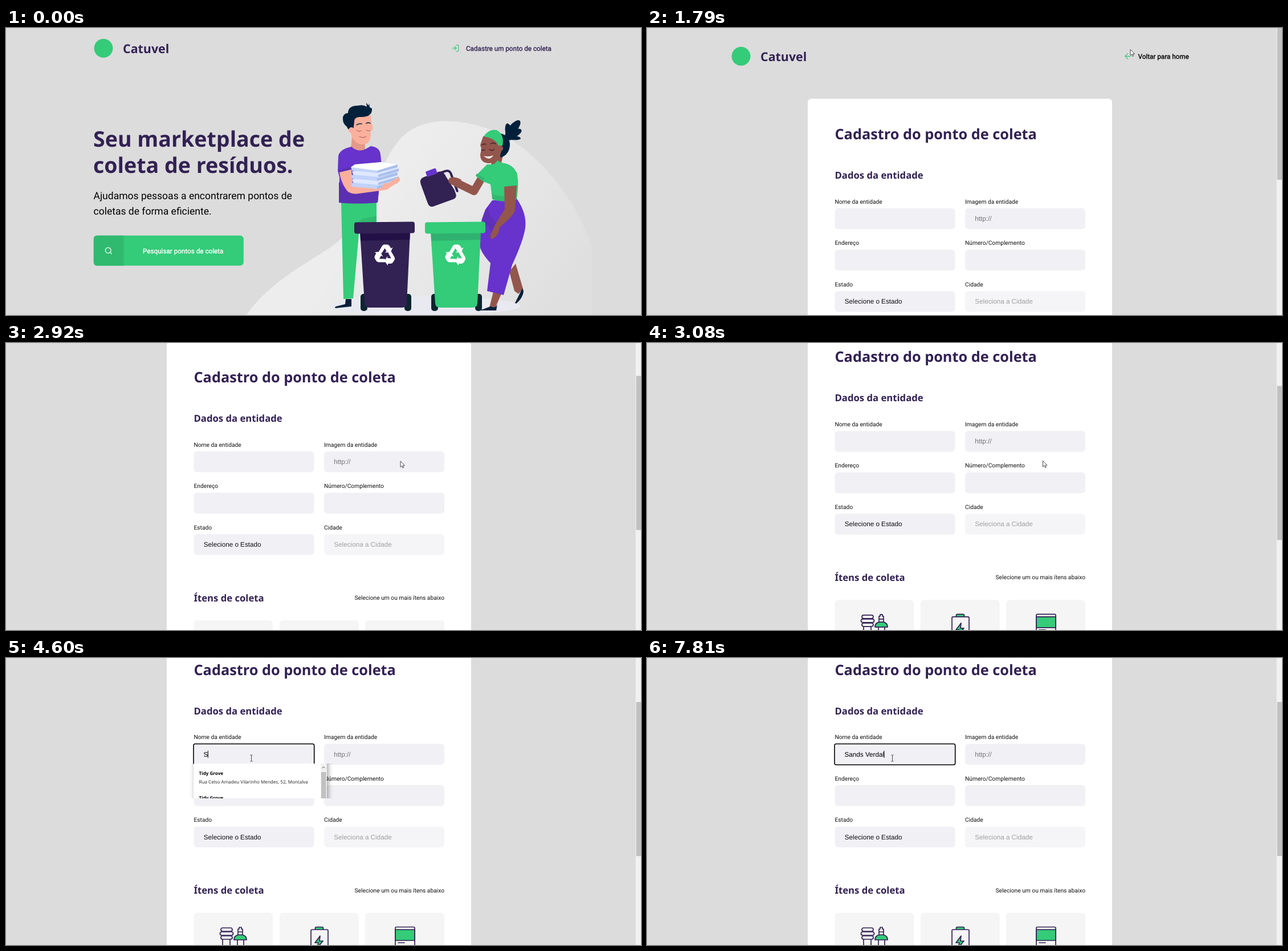
Write an HTML page that moves like this. It is 1114x503 px and loops after 8000 ms.

```html
<!DOCTYPE html>
<html lang="pt-BR">
<head>
<meta charset="utf-8">
<title>Ponto de coleta</title>
<style>
html, body { margin: 0; width: 100%; height: 100%; overflow: hidden; background: #dcdcdc; }
svg { display: block; }
text { text-rendering: geometricPrecision; white-space: pre; }
.head { font-family: "Noto Sans", sans-serif; font-weight: 700; fill: #322153; }
.h1 { font-size: 37.6px; }
.h2 { font-size: 25.3px; }
.h3 { font-size: 16.7px; }
.brand { font-size: 21.4px; }
.lead { font: 17.53px Roboto, sans-serif; }
.link { font: 11.69px Roboto, sans-serif; stroke-width: .35px; }
.label { font: 10.23px Roboto, sans-serif; fill: #111; }
.input { font: 11.69px "Liberation Sans", Arial, sans-serif; }
.tip { font: 8.1px "Open Sans", sans-serif; fill: #222; }
.tip.b { font-weight: 700; fill: #000; }
.icon { fill: none; stroke: #34cb79; stroke-width: 2; stroke-linecap: round; stroke-linejoin: round; }
.item { stroke: #322153; stroke-width: 1.7; stroke-linejoin: round; stroke-linecap: round; fill: #f5f5f5; }
.item .g { fill: #34cb79; }
.skin { fill: #fbb09d; }
.brown { fill: #93564c; }
.navy { fill: #02203a; }
.green { fill: #34cb79; }
.purple { fill: #6733cc; }
.plum { fill: #322153; }
.line { fill: none; stroke-linecap: round; stroke-linejoin: round; }
</style>
</head>
<body>
<svg width="1114" height="503" viewBox="0 0 1114 503">
<defs>
  <linearGradient id="blob" gradientUnits="userSpaceOnUse" x1="680" y1="260" x2="980" y2="470">
    <stop offset="0" stop-color="#ededed"/><stop offset="1" stop-color="#dfdfdf"/>
  </linearGradient>
  <path id="turn" d="M-11-6L-5.500-15.500Q-4-18.500-1-18.500H3.500Q6.500-18.500 8-16L10.500-11.800 13.500-13.500 9.500-4.500H-.5L2.700-6.500-.5-12-6-3z"/>
  <g id="recycle" fill="#fff">
    <use href="#turn"/><use href="#turn" transform="rotate(120)"/><use href="#turn" transform="rotate(240)"/>
  </g>
  <g id="bin">
    <g fill="#0c2530"><rect x="11" y="126" width="12" height="30" rx="5"/><rect x="88" y="126" width="12" height="30" rx="5"/></g>
    <path d="M10 17H98L92 143q-1 7-8 7H26q-7 0-8-7z"/>
    <path d="M10 18H98L97.500 31 11 33z" fill="#12003a" fill-opacity="var(--shade)"/>
    <rect width="106" height="20" rx="4" transform="rotate(-.5 53 10)"/>
    <use href="#recycle" x="54" y="58"/>
  </g>
  <clipPath id="listClip"><rect id="listBox" x="300" y="185" width="290" height="61"/></clipPath>
</defs>
<rect width="1114" height="503" fill="#dcdcdc"/>

<g id="home">
  <path d="M422 503C458 450 520 416 570 384C636 338 648 244 692 194C726 156 788 158 838 174C915 196 996 286 1028 385V503z" fill="url(#blob)"/>
  <circle cx="171" cy="35.500" r="16.500" class="green"/>
  <text class="head brand" x="205" y="44">Catuvel</text>
  <g class="icon" transform="translate(781 28) scale(.61)"><path d="M15 3h4a2 2 0 0 1 2 2v14a2 2 0 0 1-2 2h-4M10 17l5-5-5-5M15 12H3"/></g>
  <text class="link" x="807" y="39.500" fill="#322153" stroke="#322153">Cadastre um ponto de coleta</text>
  <text class="head h1" x="153" y="208">Seu marketplace de</text>
  <text class="head h1" x="153" y="254">coleta de resíduos.</text>
  <text class="lead" x="153.500" y="299.500">Ajudamos pessoas a encontrarem pontos de</text>
  <text class="lead" x="153.500" y="327">coletas de forma eficiente.</text>
  <rect x="153.800" y="363.800" width="263" height="52.600" rx="6" class="green"/>
  <path d="M206.500 363.800H159.800q-6 0-6 6v40.600q0 6 6 6h46.700z" fill="#30ba6f"/>
  <g class="icon" transform="translate(172.500 383) scale(.61)" style="stroke:#fff"><circle cx="11" cy="11" r="8"/><path d="M21 21l-4.300-4.300"/></g>
  <text class="link" x="240" y="394.500" fill="#fff" stroke="#fff">Pesquisar pontos de coleta</text>

  <ellipse cx="735" cy="487" rx="167" ry="16.500" fill="#e9e9f1"/>
  <!-- man -->
  <path class="green" d="M588 305H650V345L620 350 609 474 592 475z"/>
  <path d="M626 334L650 330V345H612z" fill="#30ba6f"/>
  <path class="navy" d="M596 475H606V488L578 491Q576 489 579 488L595 484z"/>
  <path d="M607 190H630V212Q620 219 605 212z" fill="#e39a88"/>
  <path class="purple" d="M583 224Q586 212 606 208Q618 219 631 212L640 207Q656 209 657 222L659 240 652 306Q615 309 584 306L585 262 582 250z"/>
  <path d="M584 270Q600 296 654 285L652 306Q615 309 584 306z" fill="#5a30b0"/>
  <path d="M584 249L606 243 608 250 586 254z" fill="#5a30b0"/>
  <path class="skin" d="M585 253L606 248 608 276 662 275 670 270 690 262Q693 266 684 273L664 284 620 290Q602 293 596 282Q587 268 585 253z"/>
  <g id="papers"></g>
  <path class="skin" d="M659 281Q661 270 671 272L686 262Q693 262 690 269L680 275 667 284z"/>
  <path class="skin" d="M607 156L640 153 641 165 644 176 640 181Q641 204 627 204Q609 204 605 184z"/>
  <path class="navy" d="M591 160Q590 150 600 149Q600 136 618 136Q627 134 633 138L632 131 636 136 637 132 638 139 642 141Q643 156 623 156Q611 155 611 164L609 182Q600 180 598 173Q591 168 591 160z"/>
  <circle cx="606" cy="179" r="5" class="skin"/>
  <path class="line" stroke="#02203a" stroke-width="1.500" d="M615 170q4-3 9-2M632 167q4-2 7 0"/>
  <path class="line" stroke="#9b5c55" d="M615 179q4 4 8 1M632 179q4 3 7 0M620 190q6 4 12 0"/>

  <use href="#bin" x="611" y="340" class="plum" style="--shade:.5"/>
  <!-- jug -->
  <g transform="translate(758 281) rotate(-20)">
    <path class="line" stroke="#322153" stroke-width="4" d="M14-24H22Q30-24 30-16V16"/>
    <path class="plum" d="M-16-27H10Q19-27 20-15L26 12V19Q26 27 18 27H-18Q-26 27-26 18V-17Q-26-27-16-27z"/>
    <rect class="purple" x="-11" y="-35" width="19" height="10" rx="2"/>
  </g>

  <!-- woman -->
  <path class="brown" d="M883 427L894 413 907 457 899 466 892 461z"/>
  <path class="navy" d="M893 482L906 456 908 461Q907 473 895 483z"/>
  <path class="brown" d="M855 462L869 466 859 489 848 490z"/>
  <path class="navy" d="M831 495L850 488Q860 492 862 484L860 495z"/>
  <path class="purple" d="M853 302L896 299Q914 325 911 350Q908 372 888 415L873 468 844 461 850 412Q833 394 831 381Q828 350 841 318z"/>
  <path d="M845 314Q848 334 866 345L858 368 848 350 834 336z" fill="#5a30b0" opacity=".6"/>
  <path class="line" stroke="#93564c" stroke-width="14" d="M835 262L821 286 794 273"/>
  <path class="brown" d="M799 266Q786 259 778 263Q774 268 779 273L793 280z"/>
  <path class="brown" d="M853 222H872L868 242 851 243z"/>
  <path class="green" d="M824 259L844 239Q858 241 862 232L869 236Q888 238 895 252Q901 266 896 300Q872 307 853 300L850 274 837 269z"/>
  <path d="M824 259L837 269 840 264 826 255zM853 291Q872 298 896 291V300Q872 307 853 300z" fill="#30ba6f"/>
  <path class="brown" d="M874 278L896 276 893 320Q889 331 866 349Q865 365 852 370Q847 366 853 356L858 345 875 317z"/>
  <path class="green" d="M874 250Q872 263 873 278L896 275 897 254z"/>
  <g class="navy">
    <ellipse cx="889" cy="177" rx="19" ry="7.500" transform="rotate(-50 889 177)"/>
    <ellipse cx="890" cy="186" rx="16" ry="6.500" transform="rotate(-28 890 186)"/>
    <ellipse cx="882" cy="182" rx="15" ry="6" transform="rotate(-100 882 182)"/>
    <ellipse cx="888" cy="192" rx="15" ry="4" transform="rotate(6 888 192)"/>
    <path d="M862 184Q884 186 884 205Q883 222 868 227L858 205z"/>
  </g>
  <path class="brown" d="M837 190Q866 184 870 208Q868 237 848 237Q832 237 832 222L834 212 832 205z"/>
  <path class="green" d="M838 190Q847 176 861 179Q875 187 871 206L864 206Q858 193 838 190z"/>
  <circle cx="867" cy="211" r="5" class="brown"/>
  <path class="line" stroke="#3b1c26" stroke-width="1.300" d="M835 205q4-3 7-1M850 203q5-3 9 0M834 213q4 3 6 0M848 213q5 3 8 0"/>
  <path d="M838 224Q847 227 855 223Q848 234 838 224z" fill="#fff"/>

  <use href="#bin" x="735" y="340" class="green" style="--shade:.13"/>
</g>

<g id="form">
  <g id="page">
    <circle cx="165" cy="49.500" r="16.500" class="green"/>
    <text class="head brand" x="199" y="58">Catuvel</text>
    <g class="icon" transform="translate(836.300 42.200) scale(.61)"><path d="M20 12H4M12 20l-8-8 8-8"/></g>
    <text class="link" x="861.500" y="53.800" stroke="#000">Voltar para home</text>
    <rect x="282" y="124" width="534" height="900" rx="6" fill="#fff"/>
    <text class="head h2" x="329.500" y="195">Cadastro do ponto de coleta</text>
    <text class="head h3" x="329.500" y="264">Dados da entidade</text>
    <g id="fields"></g>
    <text class="head h3" x="329.500" y="578.500">Ítens de coleta</text>
    <text class="label" x="769" y="576" text-anchor="end">Selecione um ou mais ítens abaixo</text>
    <g fill="#f5f5f5">
      <rect x="329.500" y="612" width="138.500" height="130" rx="6"/>
      <rect x="480" y="612" width="138.500" height="130" rx="6"/>
      <rect x="630" y="612" width="139" height="130" rx="6"/>
    </g>
    <g class="item" transform="translate(0 165.500)">
      <rect x="380" y="492" width="13" height="16"/>
      <rect x="377" y="473" width="20" height="6" rx="3"/><rect x="375.500" y="480" width="23" height="6" rx="3"/><rect x="377" y="487" width="20" height="6" rx="3"/>
      <path d="M407 485V475H409V472H413V475H415V485M407 480H415M406 493V508H417V493"/>
      <path class="g" d="M400 494Q400 485 411 485Q422 485 422 494z"/>
      <rect class="g" x="542.500" y="471.500" width="14" height="8" rx="2"/>
      <rect x="535" y="476" width="30" height="45" rx="2"/>
      <path class="g" d="M551 487L542 499H548L546 508 556 496H550z"/>
      <rect x="683" y="471.500" width="34" height="50" rx="2"/>
      <path class="g" d="M683 476H717V495H683z"/>
      <path d="M688 499H699"/>
    </g>
    <rect id="ring" x="329" y="316" width="211.700" height="36.700" rx="3" fill="none" stroke="#000" stroke-width="1.600"/>
    <text id="typed" class="input" x="346.500" y="338"></text>
    <path id="caret" d="M0 328V340.500" stroke="#000" stroke-width="1"/>
  </g>
  <g id="list" clip-path="url(#listClip)">
    <rect x="329" y="180" width="234" height="300" fill="#fff" style="filter:drop-shadow(2px 1px 4px #0006)"/>
    <text class="tip b" x="338.500" y="205">Tidy Grove</text>
    <text class="tip" x="338.500" y="219.800">Rua Celso Amadeu Vilarinho Mendes, 52, Montalva</text>
    <g id="more">
      <text class="tip b" x="338.500" y="247.500">Tidy Grove</text>
      <rect x="552" y="185" width="11" height="100" fill="#f1f1f1"/>
      <rect x="553" y="200" width="8.500" height="80" fill="#c1c1c1"/>
      <path class="line" stroke="#555" d="M554.500 193l2.500-2.500 2.500 2.500"/>
    </g>
  </g>
  <rect x="1104.500" width="9.500" height="503" fill="#f1f1f1"/>
  <rect id="thumb" x="1105.500" y="-4" width="8.500" height="270" fill="#c1c1c1"/>
</g>

<g id="cursor">
  <path id="arrow" d="M0 0V10.500L2.500 8.300 4 12 5.800 11.200 4.200 7.700H7.400z" fill="#fff" stroke="#222" stroke-width=".8"/>
  <path id="hand" d="M-1 8V1Q0-.8 1 1V5Q3 4 3.500 5.500 5.500 5 5.700 6.300 7.300 6 7.300 7.500V10Q6.500 12 6 13.500H0Q-1 12-2 10.500L-3.500 8Q-4 6-2.300 6.700z" fill="#fff" stroke="#222" stroke-width=".8"/>
  <path id="beam" d="M-2-5.500H-.5L0-5 .5-5.500H2M0-5V5M-2 5.500H-.5L0 5 .5 5.500H2" fill="none" stroke="#333" stroke-width=".9"/>
</g>
</svg>
<script>
const $ = id => document.getElementById(id);
const show = (id, on) => $(id).style.display = on ? '' : 'none';

// Sheets of paper, bottom first
for (let i = 4; i >= 0; i--) {
  const y = i * 7;
  const x = i % 2 * 2;
  $('papers').innerHTML +=
    `<path d="M${605 + x} ${244 + y}L${658 + x} ${235 + y} ${687 + x} ${239 + y}V${244 + y}L${651 + x} ${254 + y} ${607 + x} ${250 + y}z" fill="${i % 2 ? '#dfe8ff' : '#c2d3fa'}"/>` +
    `<path d="M${651 + x} ${250 + y}L${687 + x} ${239 + y}V${244 + y}L${651 + x} ${254 + y}z" fill="#aac0ea"/>`;
}
$('papers').innerHTML += '<path d="M605 244L612 239 658 235 687 239 651 250z" fill="#fff"/>';

const fields = [
  ['Nome da entidade', ''], ['Imagem da entidade', 'http://', '#757575'],
  ['Endereço', ''], ['Número/Complemento', ''],
  ['Estado', 'Selecione o Estado', '#111'], ['Cidade', 'Seleciona a Cidade', '#a0a0a0', '#f5f5f8']
];
$('fields').innerHTML = fields.map(([label, value, color, fill = '#f0f0f5'], i) => {
  const x = i % 2 ? 558 : 329.5;
  const y = 316 + (i >> 1) * 72.5;
  return `<text class="label" x="${x}" y="${y - 8.5}">${label}</text>
    <rect x="${x}" y="${y}" width="211" height="36.500" rx="6" fill="${fill}"/>
    <text class="input" x="${x + 17.3}" y="${y + 22}" fill="${color}">${value}</text>`;
}).join('');

const LOOP = 8000;
// start, end, number of updates: motion is stepped like a screen recording
const bursts = [[70, 520, 7], [670, 980, 5], [1530, 1630, 2], [1790, 1790, 1],
  [2140, 2920, 11], [3000, 3770, 11], [3850, 3850, 1], [4140, 4220, 2]];
const snap = t => {
  let s = 0;
  for (const [a, b, n] of bursts) {
    if (t < a) break;
    const step = n > 1 ? (b - a) / (n - 1) : 1;
    s = Math.min(b, a + Math.floor((t - a) / step + 1e-6) * step);
  }
  return s;
};

// time, x, y of the pointer tip
const path = [[70, 991, 431], [520, 860, 38], [600, 860, 38], [980, 848, 37.5], [1500, 848, 37.5],
  [1530, 844, 34], [1630, 848, 37.5], [2100, 848, 38], [2452, 586, 204.5], [2620, 610, 206],
  [2920, 692, 207], [3077, 694.5, 206.5], [3300, 600, 185], [3540, 500, 170], [3770, 525, 187],
  [3850, 437, 186], [4140, 434, 179], [4220, 430.5, 175.5]];
const pointer = t => {
  const i = path.findIndex(k => k[0] > t);
  if (i < 0) return path.at(-1).slice(1);
  const [a, b] = [path[Math.max(0, i - 1)], path[i]];
  const f = Math.max(0, (t - a[0]) / (b[0] - a[0]));
  const e = f * f * (3 - 2 * f);
  return [1, 2].map(j => a[j] + (b[j] - a[j]) * e);
};

const entry = 'Sands Verdal';
const keyTimes = [4600, 4710, 5070, 5320, 5390, 6160, 6560, 6710, 6860, 7030, 7580, 7810];

function draw(t) {
  const s = snap(t);
  const onForm = t >= 1790;
  show('home', !onForm);
  show('form', onForm);

  const p = Math.min(1, Math.max(0, (s - 2700) / 460));
  const scroll = 165.5 * (1 - (1 - p) ** 2.2);
  $('page').setAttribute('transform', `translate(0 ${-scroll})`);
  $('thumb').setAttribute('y', -4 + scroll * .49);

  show('ring', s >= 3540);
  $('typed').textContent = entry.slice(0, keyTimes.filter(k => t >= k).length);
  show('caret', t >= 4220 && !(t >= 5930 && t < 6160));
  const length = $('typed').textContent ? $('typed').getComputedTextLength() : 0;
  $('caret').setAttribute('transform', `translate(${346.5 + length} 0)`);

  show('list', t >= 4600 && t < 4850);
  show('more', t < 4710);
  $('listBox').setAttribute('height', t < 4710 ? 61 : 41);

  const [x, y] = pointer(s);
  const hand = s >= 520 && !onForm;
  const beam = s >= 4140 || (s >= 3400 && s < 3700);
  show('cursor', t >= 70);
  show('hand', hand);
  show('beam', beam);
  show('arrow', !hand && !beam);
  $('cursor').setAttribute('transform', `translate(${x} ${y})`);
}

const start = performance.now();
function tick() {
  draw((performance.now() - start) % LOOP);
  requestAnimationFrame(tick);
}
tick();
</script>
</body>
</html>
```
